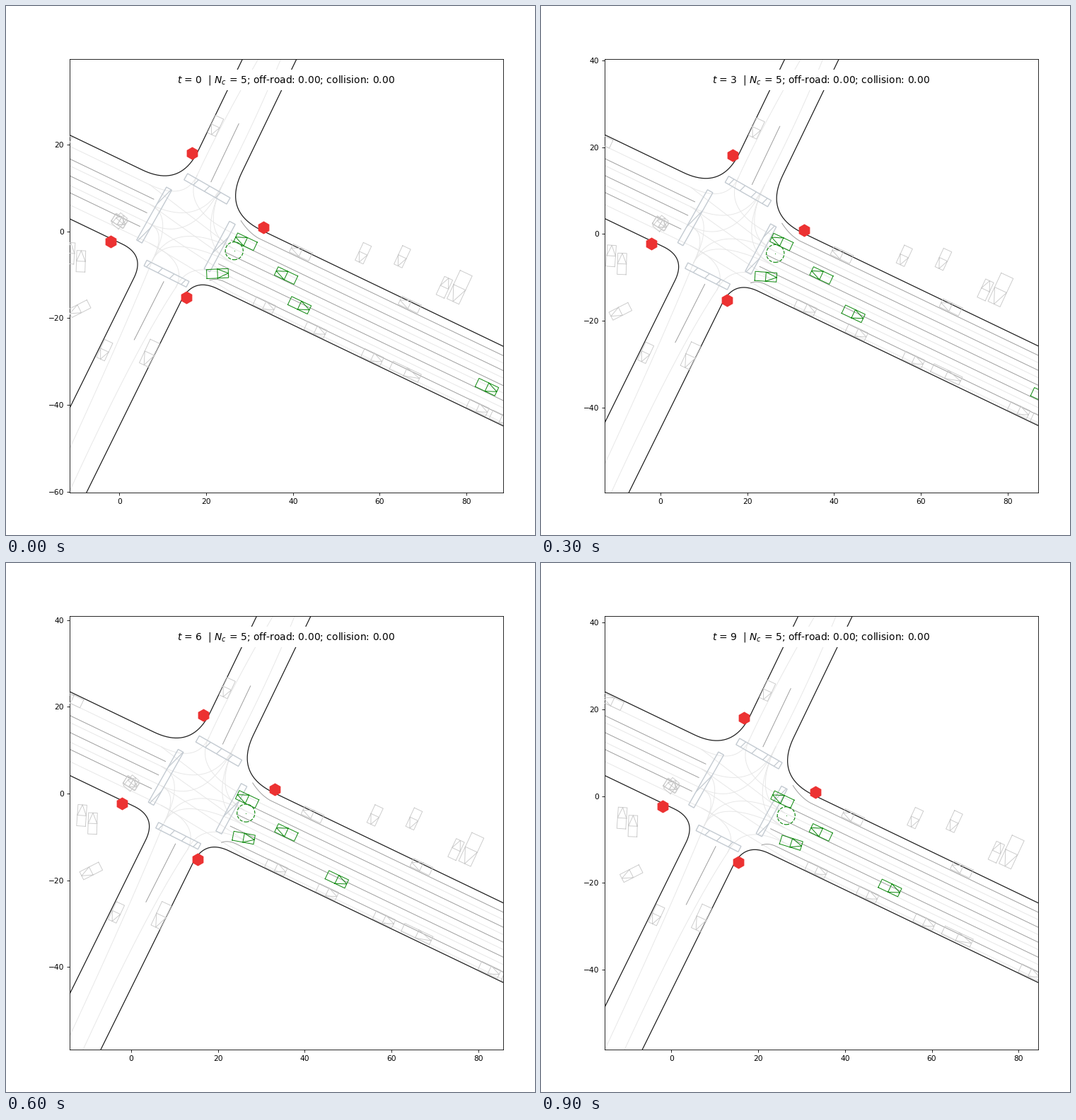
Animation of 748x748 px, one loop 1000 ms. Source, as a matplotlib script:

```python
import numpy as np
import matplotlib.pyplot as plt
from matplotlib.animation import FuncAnimation
from matplotlib.patches import Circle, Polygon
from matplotlib.ticker import MultipleLocator

FRAMES, INTERVAL = 10, 100
PT = 77 / 74.8                       # text and line scale
EW, NORTH, SOUTH = -0.48, 2.07, 2.025  # slopes of the crossing roads
EW_ANGLE, NS_ANGLE = -25.3, 65
GREEN = "#148c14"

plt.rcParams["font.family"] = "DejaVu Sans"
plt.rcParams["hatch.linewidth"] = 1.2

fig = plt.figure(figsize=(10, 10), dpi=74.8, facecolor="white")
ax = fig.add_axes([0.12, 0.08, 0.82, 0.82])
ax.tick_params(labelsize=10 * PT, length=3.5 * PT, pad=3.5 * PT)
ax.xaxis.set_major_locator(MultipleLocator(20))
ax.yaxis.set_major_locator(MultipleLocator(20))


def path(points, color, width=0.9, z=1):
    x, y = np.transpose(points)
    return ax.plot(x, y, color=color, lw=width * PT, zorder=z)[0]


def light(points):
    path(points, "#e7e7e7")


def marking(points):
    path(points, "#9c9c9c", z=2)


def on_ew(x, offset):
    return x, offset + EW * x


def on_ns(y, offset, slope):
    return offset + y / slope, y


def bezier(p, c, q):
    s = np.linspace(0, 1, 24)[:, None]
    return (1 - s) ** 2 * np.array(p) + 2 * s * (1 - s) * np.array(c) + s ** 2 * np.array(q)


def crossing(ew_offset, ns_offset, slope):
    y = (ew_offset + EW * ns_offset) / (1 - EW / slope)
    return np.array(on_ns(y, ns_offset, slope))


def border(ew_offset, ns_offset, slope, radius, ew_side, ns_side):
    """Two road edges joined by a rounded corner."""
    corner = crossing(ew_offset, ns_offset, slope)
    along = ew_side * np.array([1, EW]) / np.hypot(1, EW)
    up = ns_side * np.array([1, slope]) / np.hypot(1, slope)
    curve = bezier(corner + radius * along, corner, corner + radius * up)
    path(np.vstack([corner + 120 * along, curve, corner + 120 * up]), "#1c1c1c", 1.15, 3)


def turn(p, q, slope):
    """Curve from p on an east-west lane to q on a north-south lane."""
    light(bezier(p, crossing(p[1] - EW * p[0], q[0] - q[1] / slope, slope), q))


def box(x, y, length, width, angle, shape):
    a = np.radians(angle)
    u, v = (np.array(shape) * (length, width)).T
    return np.column_stack([x + u * np.cos(a) - v * np.sin(a),
                            y + u * np.sin(a) + v * np.cos(a)])


RECT = [(-.5, -.5), (.5, -.5), (.5, .5), (-.5, .5), (-.5, -.5)]
CAR = RECT + [(np.nan, np.nan), (0, -.5), (.5, 0), (0, .5), (0, -.5)]


def parked(x, y, angle, length=4.9, width=2.05):
    path(box(x, y, length, width, angle, CAR), "#c9c9c9", 0.85, 4)


border(16.68, 9.17, NORTH, 9.7, -1, 1)
border(15.96, 21.64, NORTH, 10, 1, 1)
border(-2.63, 8.63, SOUTH, 5.9, -1, -1)
border(-2.4, 22.13, SOUTH, 6.2, 1, -1)

# Lane markings
for i in range(3):
    marking([on_ew(-30, 11.2 - 3.9 * i), on_ew(7.9 - 1.6 * i, 11.2 - 3.9 * i)])
for i in range(1, 4):
    marking([on_ew(27.2 - 1.45 * i, 13.8 - 3.45 * i), on_ew(95, 13.8 - 3.45 * i)])
for start, bend, x, offset in [((28, 2.45), (29.7, -0.2), 32, 13.8),
                               ((20.8, -11.3), (22.3, -10.7), 24.2, 0)]:
    marking(np.vstack([bezier(start, bend, on_ew(x, offset)), on_ew(95, offset)]))
marking([(21.1, 11.4), (27.5, 24.8)])
marking([(10.2, -11.6), (3.4, -25)])

# Lane centres and the ways through the junction
west = [on_ew(7, 14.1 - 4.5 * i) for i in range(4)]
east = [on_ew(26, 12.1 - 3.45 * i) for i in range(5)]
exits = [((17.9, 12.9), NORTH), ((24, 11.3), NORTH),
         ((7.6, -6.7), SOUTH), ((13, -12.9), SOUTH)]
for lanes, length in ((west, -40), (east, 70)):
    for x, y in lanes:
        light([(x, y), (x + length, y + EW * length)])
light(bezier((17.9, 12.9), (24, 26.2), (36, 46.6)))
light(bezier((24, 11.3), (33.2, 29), (40, 46.8)))
light(bezier((7.6, -6.7), (-2, -30), (-17.5, -63)))
light(bezier((13, -12.9), (3, -28), (-13, -63.2)))
for lanes in (west, east[:4]):
    for p, way in zip(lanes, exits):
        turn(p, *way)
    for p, way in zip(lanes[1:3], exits[2:0:-1]):
        turn(p, *way)
for p, q in zip(west, east[1:]):
    light([p, q])

# Crosswalks
for x, y, length, width, angle in [(20.2, 9.8, 11.3, 1.65, -29.7), (8, 3.75, 14, 1.4, 60.6),
                                   (23.1, -3.5, 12.4, 1.5, 61.9), (10.85, -9.75, 10.9, 1.45, -26.7)]:
    ax.add_patch(Polygon(box(x, y, length, width, angle, RECT), fill=False,
                         ec="#c3cad1", lw=1.3 * PT, hatch="/", zorder=2))

# Parked cars: along the kerbs, on the lots, and one tight cluster
for x in (33.4, 45.2, 58.3, 82.6, 87.9):
    parked(*on_ew(x, -1), EW_ANGLE)
parked(*on_ew(65.9, -0.75), EW_ANGLE, 7.2)
for x in (-13.6, 41.8, 66.9):
    parked(*on_ew(x, 15.2), 180 + EW_ANGLE)
parked(*on_ns(24.3, 10.4, NORTH), 180 + NS_ANGLE, 4.4)
parked(*on_ns(-27.4, 10.1, SOUTH), 180 + NS_ANGLE, 4.5)
parked(*on_ns(-28.1, 20.8, SOUTH), 180 + NS_ANGLE, 6, 2.4)
parked(56.2, -5.05, 180 + NS_ANGLE, 4.5)
parked(65.2, -5.85, 180 + NS_ANGLE, 4.7)
parked(74.9, -12.9, NS_ANGLE, 4.6)
parked(78.4, -12.9, 180 + NS_ANGLE, 7.2, 3.05)
parked(-11.4, -5.05, 86)
parked(-8.9, -6.9, 88)
parked(-9.25, -17.85, 207)
for angle in (-35, -28, 50):
    parked(0, 2.4, angle, 3.2)

# Moving cars: four hold their lane, the last one turns into the road
STRAIGHT = [(29.05, -2.4, -0.385), (38.4, -10.2, -0.44), (41.5, -17.04, 0.985), (84.7, -35.9, 1.1)]


def moving_cars(t):
    for x, y, speed in STRAIGHT:
        yield x + speed * t, y - 0.465 * speed * t, EW_ANGLE + 180 * (speed < 0)
    yield 22.6 + 0.555 * t, -9.75 - 0.0123 * t * t, 2.5 - 2.2 * t


agents = [path(np.zeros((2, 2)), GREEN, 0.95, 5) for _ in range(5)]

goal = (26.45, -4.5)
ax.add_patch(Circle(goal, 2.05, fill=False, ec=GREEN, lw=1.15, ls="--", zorder=5))
ax.plot(*goal, ".", color=GREEN, ms=2.2, mew=0, zorder=5)
ax.plot([16.65, 33.1, -2.05, 15.4], [18.1, 0.9, -2.3, -15.2], "h",
        color="#ec3232", ms=17.5, mew=0, zorder=6)

title = ax.text(0.5, 0.9458, "", transform=ax.transAxes, ha="center", va="baseline",
                fontsize=13 * PT, zorder=7,
                bbox=dict(facecolor="white", edgecolor="none", pad=5.2))


def update(t):
    left = -11.53 - 0.48 * t + 0.005 * t * t
    bottom = -60.25 + 0.2 * t
    ax.set_xlim(left, left + 100)
    ax.set_ylim(bottom, bottom + 100)
    for line, (x, y, angle) in zip(agents, moving_cars(t)):
        line.set_data(*box(x, y, 5, 2.1, angle, CAR).T)
    title.set_text(f"$t$ = {t}  | $N_c$ = 5; off-road: 0.00; collision: 0.00")
    return agents + [title]


anim = FuncAnimation(fig, update, frames=FRAMES, interval=INTERVAL,
                     init_func=lambda: update(0), repeat=True, repeat_delay=0)
plt.show()
```
